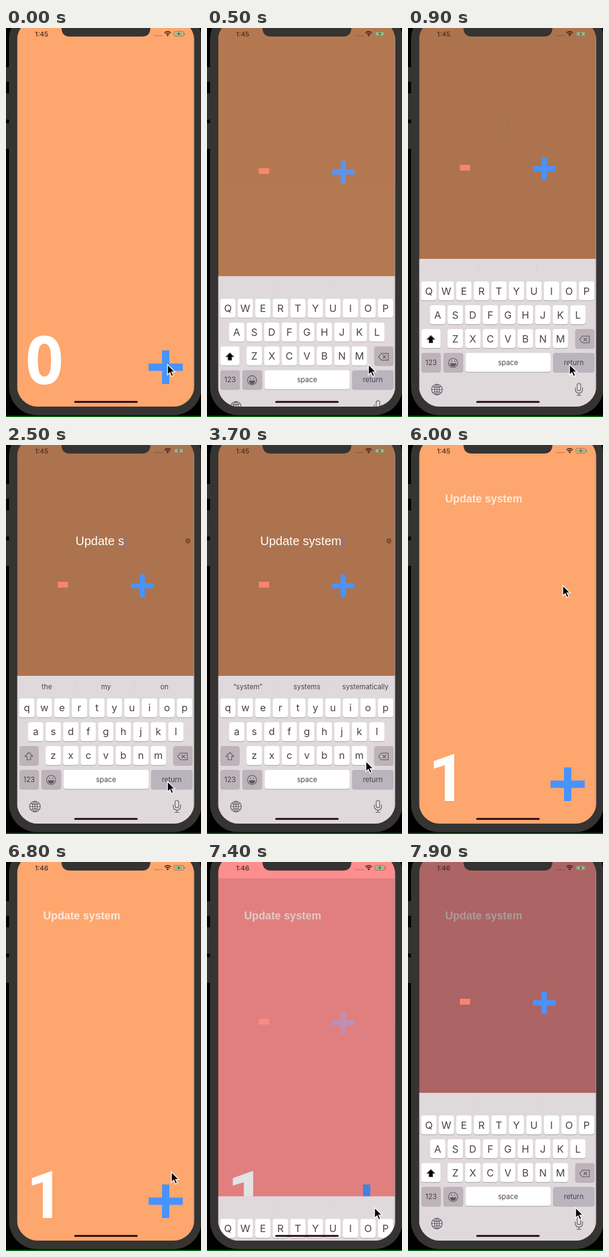
These frames come from a looping animation (320 by 637 pixels, 8 s). An HTML page:

```html
<!DOCTYPE html>
<html lang="en">
<head>
<meta charset="utf-8">
<title>Task counter</title>
<style>
html, body { margin: 0; width: 100%; height: 100%; overflow: hidden; background: #000; }
svg { display: block; width: 100%; height: 100%; }
text { font-family: "Liberation Sans", Arial, sans-serif; }
.ui text, text.ui { font-family: Inter, Roboto, sans-serif; fill: #47434a; text-anchor: middle; }
.count { font-weight: 700; fill: #fff; }
.line { fill: none; stroke: #5d5861; stroke-width: 1.1; stroke-linejoin: round; stroke-linecap: round; }
</style>
</head>
<body>
<svg viewBox="0 0 320 637">
  <defs><clipPath id="screen"><rect x="18" y="-14" width="291" height="634" rx="34"/></clipPath></defs>
  <path d="M0 636H320" stroke="#07600c" stroke-width="2"/>
  <path d="M0 64h5v24h-5zM0 107h5v43h-5zM0 156h5v42h-5z" fill="#333231"/>
  <rect x="5" y="-28" width="316" height="662" rx="46" fill="#353433"/>

  <g clip-path="url(#screen)">
    <rect id="bg" x="18" y="-14" width="291" height="640"/>
    <text id="item" x="61" y="94" font-size="17.8" font-weight="700" fill="#fff">Update system</text>
    <text id="zero" class="count" x="32" y="583" font-size="109" style="font-family:'Open Sans','Noto Sans',sans-serif">0</text>
    <text id="one" class="count" x="33.5" y="583" font-size="108" style="font-family:Roboto,sans-serif">1</text>
    <path d="M234 555.5H290M262 528V583" stroke="#4893fc" stroke-width="12"/>

    <g id="sheet">
      <rect x="18" y="-6" width="291" height="700" fill="#161616" opacity=".35"/>
      <rect x="85" y="224" width="17" height="9.5" fill="#f98370"/>
      <path d="M205 230.5H242M223.5 212V249" stroke="#4893fc" stroke-width="8.5"/>
      <text id="field" x="154" y="164" font-size="20" fill="#fff" text-anchor="middle"></text>
      <g id="clear" opacity=".6">
        <circle cx="298.5" cy="157" r="4.2" fill="#54331f"/>
        <path d="M297 155.5l3 3m0-3l-3 3" stroke="#ab704e"/>
      </g>
      <rect id="caret" y="147" width="2" height="22" fill="#6a76cf"/>
    </g>

    <g id="keyboard" class="ui">
      <rect x="18" y="378" width="291" height="259" fill="#e0d9dc"/>
      <path d="M115.5 387V403M211.5 387V403" stroke="#d9d1d5"/>
      <g id="hints" font-size="11.3"></g>
      <g id="keys"></g>
      <path id="shift" d="M37.5 503.5L44 510H40.5V515.5H34.5V510H31Z" class="line"/>
      <path d="M281.5 510L286 504.5H297.5V515.5H286ZM288.5 507.5l5 5m0-5l-5 5" class="line"/>
      <g class="line">
        <circle cx="74" cy="548.5" r="7.5"/>
        <path d="M69.5 549.5H78.5Q78 554 74 554T69.5 549.5" fill="#5d5861"/>
        <path d="M71.5 545v1.5M76.5 545v1.5"/>
        <circle cx="47.5" cy="592" r="8.8"/>
        <ellipse cx="47.5" cy="592" rx="4" ry="8.8"/>
        <path d="M38.7 592H56.3M47.5 583.2V600.8M40.5 587Q47.5 590 54.5 587M40.5 597Q47.5 594 54.5 597"/>
        <rect x="277.5" y="582" width="6" height="12" rx="3"/>
        <path d="M274.5 589v3a6 6 0 0 0 12 0v-3M280.5 598V601.5M277 601.5h7"/>
      </g>
    </g>

    <path d="M18.5 0V600" stroke="#000" stroke-opacity=".35"/>
    <path d="M308.3 0V600" stroke="#8f8f9a" stroke-opacity=".65" stroke-width="1.5"/>
    <rect x="112" y="610.8" width="104" height="3" rx="1.5" fill="#240913"/>
  </g>

  <path d="M91 -1H237Q237 14 223 14H105Q91 14 91 -1Z" fill="#353433"/>
  <text id="clock" class="ui" x="58.5" y="13.5" font-size="11" font-weight="500" style="fill:#4a2b20"></text>
  <path d="M243 12.5H257" stroke="#4a2b20" stroke-opacity=".5" stroke-width="1.5" stroke-dasharray="1.5 1.5"/>
  <g fill="none" stroke="#3a2219" stroke-width="1.6">
    <path d="M260 8Q265.3 3.5 270.6 8M262 10Q265.3 7.3 268.6 10"/>
    <circle cx="265.3" cy="12" r=".6"/>
  </g>
  <rect x="275.5" y="5.5" width="16" height="8" rx="2" fill="none" stroke="#a07a66"/>
  <rect x="277" y="7" width="13" height="5" rx="1" fill="#8cc08a"/>
  <path d="M293 8v3" stroke="#a07a66" stroke-width="1.5"/>
  <path d="M284.5 6l-3 4h2l-1 3 3-4h-2z" fill="#3b3a2a"/>

  <path id="mouse" d="M0 0V17L4 13.3L6.7 19.6L9.7 18.3L7 12.2H12.4Z" fill="#000" stroke="#fff" stroke-width="1.3"/>
</svg>
<script>
const $ = id => document.getElementById(id);
const LOOP = 8000, TITLE = 'Update system', TYPE_START = 1100, TYPE_STEP = 180;
const ORANGE = [253, 166, 109], PINK = [253, 142, 142];
const HINTS = [
  ['', '', ''], ['“U”', 'Up', 'Us'], ['“Up”', 'Update', 'Upon'], ['“Upd”', 'Update', 'Updated'],
  ['“Upda”', 'Update', 'Updated'], ['“Updat”', 'Update', 'Updated'], ['“Update”', 'Updated', 'Updates'],
  ['the', 'my', 'on'], ['the', 'my', 'on'], ['“sy”', 'system', 'symbol'], ['“sys”', 'system', 'systems'],
  ['“syst”', 'system', 'systems'], ['“syste”', 'system', 'systems'], ['“system”', 'systems', 'systematically']
];
const MOUSE = [[0, 265, 551], [3500, 265, 551], [4500, 225, 234], [5250, 225, 234],
  [5800, 254, 230], [6250, 254, 230], [7000, 275, 566], [LOOP, 275, 566]];

const clamp = x => Math.max(0, Math.min(1, x));
const span = (t, from, length) => clamp((t - from) / length);
const out = x => 1 - (1 - x) ** 2;
const smooth = x => x * x * (3 - 2 * x);
const mix = (a, b, k) => a + (b - a) * k;
const show = (id, on) => $(id).style.display = on ? '' : 'none';

function add(parent, tag, attrs, content = '') {
  const el = document.createElementNS('http://www.w3.org/2000/svg', tag);
  for (const name in attrs) el.setAttribute(name, attrs[name]);
  el.textContent = content;
  return parent.appendChild(el);
}

function key(x, y, width, fill, label, size = 16.5) {
  add($('keys'), 'rect', { x, y: y + 1.2, width, height: 31, rx: 4, fill: '#b5aeb2' });
  const cap = add($('keys'), 'rect', { x, y, width, height: 31, rx: 4, fill });
  const text = add($('keys'), 'text', { x: x + width / 2, y: y + 20, 'font-size': size }, label);
  return { cap, text };
}

const letters = [];
[['QWERTYUIOP', 34.2, 415], ['ASDFGHJKL', 48.8, 454], ['ZXCVBNM', 77.6, 493]].forEach(([row, x, y]) =>
  [...row].forEach((c, i) => letters.push({ c, y, text: key(x + i * 28.75 - 12.6, y, 25.2, '#fff', c).text })));
const GREY = '#bdb3b8';
const shiftKey = key(22, 493, 31.5, GREY, '').cap;
key(274.5, 493, 31.5, GREY, '');
key(22, 532, 32, GREY, '123', 11.5);
key(58, 532, 32.5, GREY, '');
key(94.5, 532, 139.5, '#fff', 'space', 11.5);
key(238, 532, 68, '#bab4bf', 'return', 11.5);
const hints = [67, 164, 260].map(x => add($('hints'), 'text', { x, y: 400 }));

let upper;
function setCase(isUpper) {
  if (upper === isUpper) return;
  upper = isUpper;
  letters.forEach(({ c, y, text }) => {
    text.textContent = upper ? c : c.toLowerCase();
    text.setAttribute('y', y + (upper ? 22 : 20.5));
  });
  shiftKey.setAttribute('fill', upper ? '#fff' : GREY);
  $('shift').style.fill = upper ? '#000' : 'none';
}

function draw(t) {
  const saved = t >= 5200;
  const open = t < 5100 ? out(span(t, 200, 450))
    : t < 7000 ? 1 - out(span(t, 5100, 400))
    : out(span(t, 7315, 450));
  const typed = t < TYPE_START || t > 7000 ? 0
    : Math.min(TITLE.length, 1 + Math.floor((t - TYPE_START) / TYPE_STEP));
  const typing = typed > 0 && typed < TITLE.length;

  const tint = smooth(span(t, 6900, 350));
  $('bg').setAttribute('fill', `rgb(${ORANGE.map((c, i) => mix(c, PINK[i], tint))})`);
  $('item').setAttribute('opacity', 0.75 * span(t, 5300, 350));
  show('zero', !saved);
  show('one', saved);
  $('clock').textContent = t < 6800 ? '1:45' : '1:46';

  $('sheet').setAttribute('opacity', open);
  $('sheet').setAttribute('transform', `translate(0 ${50 * (1 - open)})`);
  $('keyboard').setAttribute('transform', `translate(0 ${259 * (1 - open)})`);

  $('field').textContent = TITLE.slice(0, typed);
  show('clear', typed);
  const blink = clamp(0.5 + 1.5 * Math.cos((t - 700) * Math.PI / 500));
  const half = typed ? $('field').getComputedTextLength() / 2 : 0;
  $('caret').setAttribute('x', typed ? 154 + half : 162);
  $('caret').setAttribute('opacity', open < 0.9 ? 0 : typing ? 0.6 : 0.7 * blink);
  setCase(!typed);
  hints.forEach((h, i) => h.textContent = HINTS[typed][i]);

  const n = MOUSE.findIndex(m => m[0] > t);
  const [a, b] = [MOUSE[n - 1], MOUSE[n]];
  const k = smooth(span(t, a[0], b[0] - a[0]));
  $('mouse').setAttribute('transform', `translate(${mix(a[1], b[1], k)} ${mix(a[2], b[2], k)})`);
}

const start = performance.now();
function tick() {
  draw((performance.now() - start) % LOOP);
  requestAnimationFrame(tick);
}
tick();
</script>
</body>
</html>
```
